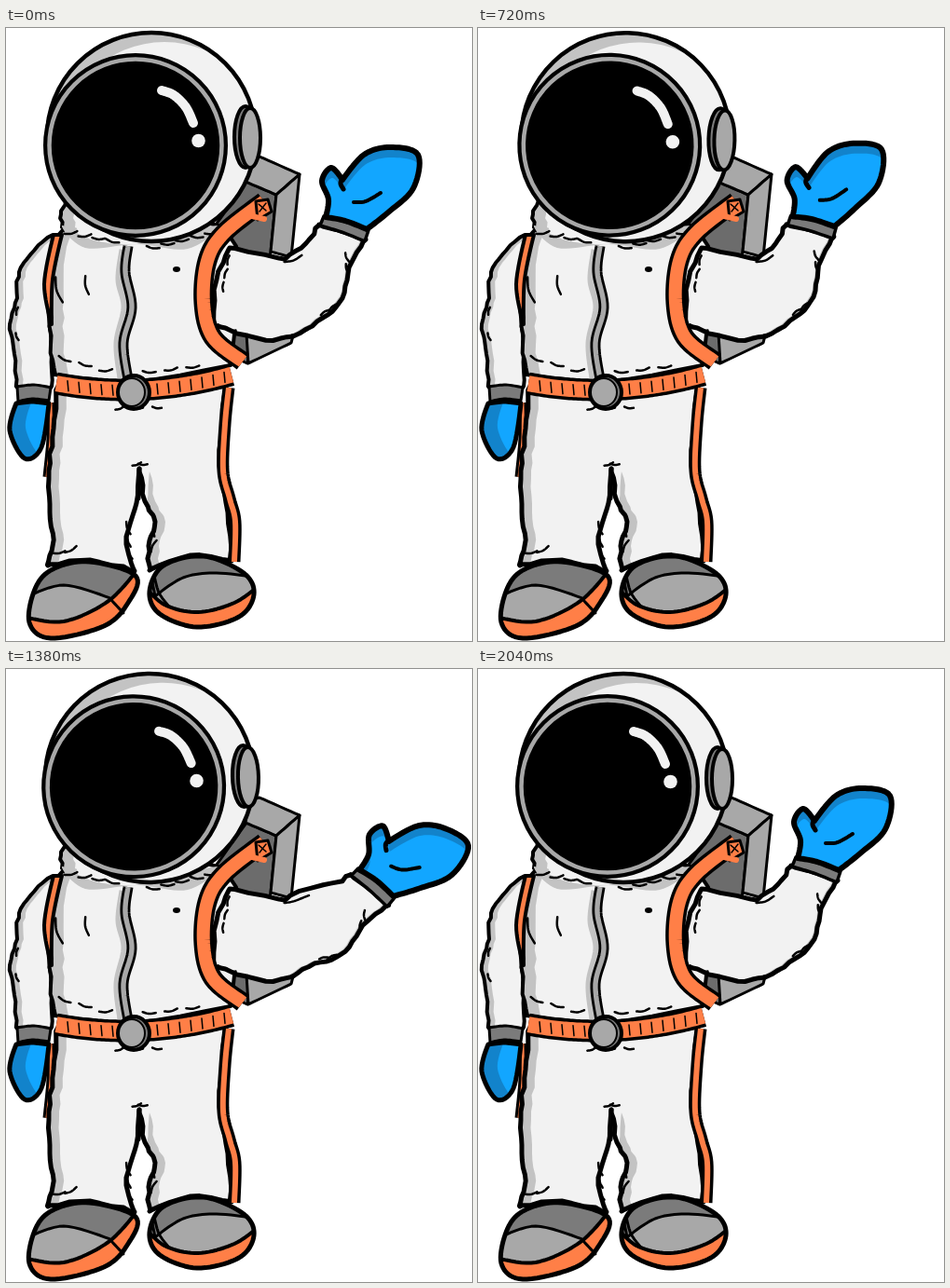
Write an HTML page with a canvas that moves like this. It is 500 px wide and 658 px high and loops after 2.07 s.

```html
<!DOCTYPE html>
<html lang="en">
<head>
<meta charset="utf-8">
<title>Waving astronaut</title>
<style>
html, body { margin: 0; width: 100%; height: 100%; overflow: hidden; background: #fff; }
canvas { display: block; }
</style>
</head>
<body>
<canvas id="stage" width="500" height="658"></canvas>
<script>
const ctx = document.getElementById('stage').getContext('2d');
const SUIT = '#f2f2f2', SHADE = '#c3c3c3', GREY = '#a8a8a8', MID = '#7b7b7b', DARK = '#6c6c6c';
const ORANGE = '#ff7f47', BLUE = '#12a6ff', NAVY = '#1283cb', BLACK = '#000';

const LOOP = 2070, STEP = 30, CYCLE = 2040;
const still = p => p;
let place = still;

const noise = n => {
  const v = Math.sin(n * 127.1) * 43758.5;
  return v - Math.floor(v) - .5;
};

// Smooth path through key points; "!" marks a corner, rough adds an inked wobble.
function curve(text, closed, rough = 0) {
  const pts = text.trim().split(/\s+/).map(s => ({ sharp: s.endsWith('!'), xy: s.replace('!', '').split(',').map(Number) }));
  const n = pts.length;
  const at = i => closed ? pts[(i + n) % n] : pts[Math.max(0, Math.min(n - 1, i))];
  const pull = (i, k) => at(i).sharp ? 0 : (at(i + 1).xy[k] - at(i - 1).xy[k]) / 2;
  const path = new Path2D();
  const steps = rough ? 5 : 10;
  for (let i = 0; i < (closed ? n : n - 1); i++) {
    for (let j = 0; j <= steps; j++) {
      const u = j / steps, v = 1 - u;
      const p = [0, 1].map(k => {
        const a = at(i).xy[k], b = at(i + 1).xy[k];
        const wobble = j % steps ? 2 * rough * noise(i * 31 + j * 7 + k + n) : 0;
        return a * v * v * (1 + 2 * u) + b * u * u * (3 - 2 * u)
          + u * v * (v * pull(i, k) - u * pull(i + 1, k)) + wobble;
      });
      path.lineTo(...place(p));
    }
  }
  if (closed) path.closePath();
  return path;
}

function outline(path, width) {
  ctx.strokeStyle = BLACK;
  ctx.lineWidth = width;
  ctx.stroke(path);
}

function inside(path, paint) {
  ctx.save();
  ctx.clip(path);
  paint();
  ctx.restore();
}

// Shadow is what stays uncovered when the lit copy is shifted by (dx, dy).
function solid(path, fill, width = 4, shade, dx = 0, dy = 0) {
  ctx.fillStyle = shade || fill;
  ctx.fill(path);
  if (shade) inside(path, () => {
    ctx.translate(dx, dy);
    ctx.fillStyle = fill;
    ctx.fill(path);
  });
  if (width) outline(path, width);
}

const shape = (text, ...style) => solid(curve(text, true), ...style);
const inked = (text, ...style) => solid(curve(text, true, 1.3), ...style);

function line(text, width = 3, color = BLACK, cap = 'round') {
  ctx.lineCap = cap;
  ctx.strokeStyle = color;
  ctx.lineWidth = width;
  ctx.stroke(curve(text));
}

function band(text, width, color, edge = 3) {
  line(text, width, BLACK, 'butt');
  line(text, width - 2 * edge, color, 'butt');
}

// Short folds scattered along a line.
function folds(x0, y0, x1, y1, count, size = 7) {
  for (let i = 0; i < count; i++) {
    const u = (i + .5) / count, seed = x0 + y1 + i * 5;
    const x = x0 + (x1 - x0) * u, y = y0 + (y1 - y0) * u;
    const a = Math.atan2(y1 - y0, x1 - x0) + noise(seed) * .8;
    const dx = Math.cos(a) * size, dy = Math.sin(a) * size;
    line(`${x - dx},${y - dy} ${x - dy * .2},${y + dx * .2} ${x + dx},${y + dy}`, 2.5);
  }
}

function oval(x, y, rx, ry, fill, width = 0, color = BLACK) {
  const path = new Path2D();
  path.ellipse(x, y, rx, ry, 0, 0, 2 * Math.PI);
  if (fill) { ctx.fillStyle = fill; ctx.fill(path); }
  if (width) { ctx.strokeStyle = color; ctx.lineWidth = width; ctx.stroke(path); }
}

function backpack() {
  shape('226,210! 258,165! 290,179! 284,240! 259,360! 232,348!', DARK, 3);
  shape('261,140! 272,138! 315,157! 290,179! 257,165!', GREY, 3);
  shape('290,179! 315,157! 306,246! 284,240!', GREY, 3);
  shape('258,328! 260,360! 306,338! 310,322!', GREY, 3);
}

function legs() {
  band('48,402 48,440 44,482', 9, ORANGE);
  inked('55,386! 51,430 46,475 47,520 50,556 45,577! 90,571 138,583! 129,546 140,510 143,473! 149,508 160,530 153,556 154,582! 198,566 242,572! 238,520 229,470 236,385!', SUIT, 5, SHADE, 11, 0);
  line('143,473 142,505', 5);
  band('239,386 235,425 233,475 240,505 246,530 245,573', 13, ORANGE, 3.5);
  folds(137, 468, 150, 468, 2, 5);
  folds(131, 530, 133, 570, 3);
  folds(160, 530, 158, 565, 2);
  folds(50, 564, 76, 558, 2);
  folds(112, 408, 172, 407, 3, 5);
}

function boot(text, toe, sole) {
  const path = curve(text, true);
  solid(path, GREY, 0);
  inside(path, () => {
    shape(toe, MID, 3);
    shape(sole, ORANGE, 4);
  });
  outline(path, 5);
}

function boots() {
  boot('52,580 32,600 25,638 48,655 105,642 131,617 139,588 90,573',
    '20,612! 62,598 114,613! 145,580! 80,550! 20,570!',
    '20,632! 62,637 110,615 142,580! 160,660! 20,670!');
  line('112,613 126,628');
  boot('169,577 154,605 165,629 205,643 250,632 266,608 255,585 212,567',
    '160,610! 190,590 226,585 270,590! 260,550! 150,560!',
    '148,598! 170,619 206,627 245,617 272,598! 275,660! 150,660!');
  line('159,588 164,606 174,620');
}

function restingArm() {
  inked('52,222 30,239 14,262 12,290 4,318 9,350 12,386! 48,386! 49,350 46,310 48,260', SUIT, 4, SHADE, 7, 0);
  folds(12, 290, 12, 345, 2, 4);
  shape('12,385! 30,383 48,386! 46,400! 28,398 13,401!', MID, 3);
  shape('11,403! 4,432 20,462 38,450 46,403! 28,401', BLUE, 5, NAVY, 17, -3);
}

function torso() {
  inked('68,180! 59,200 62,217! 51,235 48,290 48,340 52,372! 135,380 241,362! 246,310 250,245 228,212!', SUIT, 4, SHADE, 14, 0);
  shape('60,212 95,228 145,231 228,212 195,237 140,232 85,236', SHADE, 0);
  line('126,238 122,270 128,300 120,338 124,376', 9, SHADE, 'butt');
  band('131,234 128,262 135,300 126,338 131,377', 11, GREY, 2.8);
  folds(62, 218, 122, 230, 4);
  folds(150, 237, 228, 218, 5);
  folds(52, 352, 118, 370, 3);
  folds(142, 370, 212, 362, 3);
  folds(56, 266, 58, 296, 1, 14);
  folds(87, 264, 87, 288, 1, 10);
  oval(183, 259, 4, 3, BLACK);
  shape('51,222! 60,222! 50,270 49,318! 41,275', ORANGE, 4);
}

function belt() {
  const y = x => 388.5 - 16 * ((x - 128) / 113) ** 2;
  const along = (from, to, gap) => {
    const xs = [];
    for (let x = from; x <= to; x += gap) xs.push(x);
    return xs;
  };
  band(along(54, 242, 23.5).map(x => `${x},${y(x)}`).join(' '), 24, ORANGE, 3.5);
  along(66, 236, 12).forEach(x => line(`${x},${y(x) - 5} ${x + 1},${y(x) + 6}`, 1.5));
  oval(137, 391, 17, 18, MID, 4);
  oval(135, 391, 14, 15, GREY, 2);
}

// Turn the forearm about the elbow, fading out toward the shoulder.
function elbow(degrees) {
  return ([x, y]) => {
    const s = Math.max(0, Math.min(1, (x + Math.max(0, 240 - y) * .6 - 300) / 45));
    const a = degrees * Math.PI / 180 * s * s * (3 - 2 * s);
    const dx = x - 328, dy = y - 305, c = Math.cos(a), k = Math.sin(a);
    return [328 + dx * c - dy * k, 305 + dx * k + dy * c];
  };
}

function wavingArm(degrees) {
  place = elbow(degrees);
  inked('222,318! 226,270 240,236! 299,248! 322,231 336,211! 386,227! 368,257 361,290 340,311 308,331 270,333', SUIT, 5, SHADE, -3, -2);
  folds(298, 249, 318, 246, 1, 10);
  folds(366, 240, 366, 264, 2, 5);
  folds(354, 298, 338, 308, 2, 5);
  folds(306, 330, 328, 321, 2, 5);
  shape('337,212! 341,202! 362,206 389,217! 385,229! 360,219', MID, 3.5);
  shape('343,203! 346,184 339,164 349,150 361,163! 384,136 412,128 442,136 437,172 410,198 387,216! 364,207', BLUE, 6, NAVY, 1, 11);
  line('361,161 359,167 362,173', 5);
  line('373,187 386,186 402,177', 4);
  place = still;
}

function strap() {
  band('277,186 234,220 216,250 212,295 222,332 254,358', 21, ORANGE, 3.5);
  shape('268,186! 281,184! 285,197! 270,206!', ORANGE, 3);
  line('264,202 277,205', 6, ORANGE);
  line('271,189 279,196', 1.5);
  line('279,188 272,197', 1.5);
  folds(228, 318, 246, 326, 2, 5);
  folds(240, 242, 232, 285, 3, 5);
}

function head(tilt) {
  ctx.save();
  ctx.translate(150, 230);
  ctx.rotate(tilt * Math.PI / 180);
  ctx.translate(-150, -230);
  const shell = new Path2D();
  shell.arc(156, 117, 112, 0, 2 * Math.PI);
  solid(shell, SUIT, 4.5, SHADE, 14, 10);
  oval(139, 126, 94, 94, BLACK, 10);
  oval(139, 126, 92.5, 92.5, null, 4.5, GREY);
  line('167,67 180,72 193,85 201,102', 10, SUIT);
  oval(206.5, 121, 7.3, 7.3, SUIT);
  oval(257, 117, 12, 33, MID, 4);
  oval(262, 118, 11, 32, GREY, 4);
  ctx.restore();
}

// Key poses of the forearm: time, degrees.
const SWING = [[0, 0], [270, -7.5], [400, -9], [720, -3], [1050, 9.5], [1380, 21.5], [1450, 22.5], [1680, 13]];

function swing(t) {
  const n = SWING.length;
  const key = i => {
    const turn = Math.floor(i / n), [time, value] = SWING[i - turn * n];
    return [time + turn * CYCLE, value];
  };
  const slope = i => (key(i + 1)[1] - key(i - 1)[1]) / (key(i + 1)[0] - key(i - 1)[0]);
  let i = 0;
  while (key(i + 1)[0] <= t) i++;
  const [t0, a] = key(i), [t1, b] = key(i + 1);
  const d = t1 - t0, u = (t - t0) / d, v = 1 - u;
  return a * v * v * (1 + 2 * u) + b * u * u * (3 - 2 * u)
    + d * u * v * (v * slope(i) - u * slope(i + 1));
}

function draw(now) {
  const t = Math.floor((now % LOOP) / STEP) * STEP % CYCLE;
  ctx.fillStyle = '#fff';
  ctx.fillRect(0, 0, 500, 658);
  ctx.lineJoin = 'round';
  backpack();
  legs();
  boots();
  restingArm();
  torso();
  belt();
  wavingArm(swing(t));
  strap();
  head(-1.3 * Math.sin(4 * Math.PI * t / CYCLE));
}

const start = performance.now();
function tick() {
  draw(performance.now() - start);
  requestAnimationFrame(tick);
}
tick();
</script>
</body>
</html>
```
